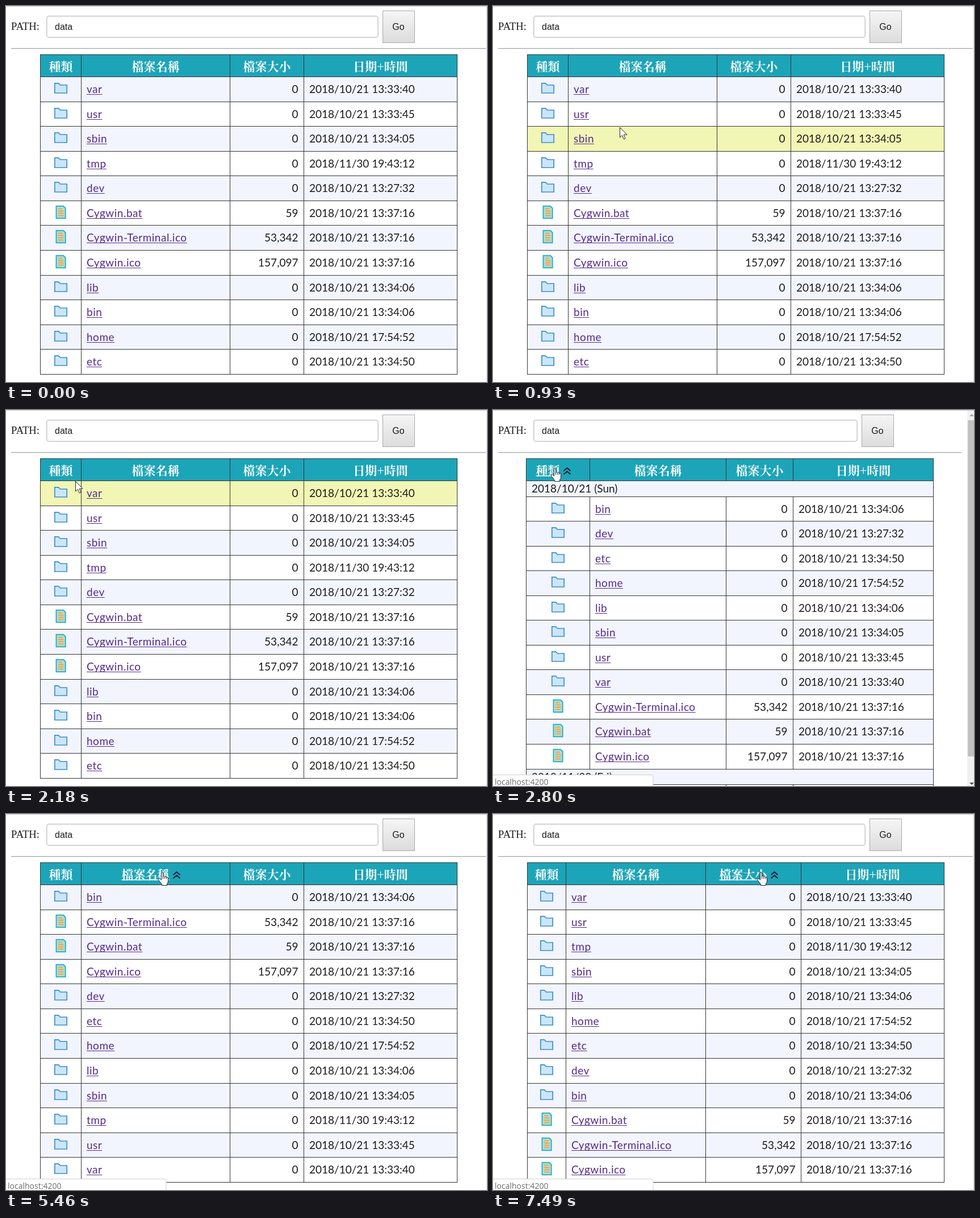
Animation, 847 px wide and 661 px high, one loop 8000 ms. Source, as an HTML page with a canvas:

```html
<!DOCTYPE html>
<html lang="zh-Hant">
<head>
<meta charset="utf-8">
<title>File list</title>
<style>
html, body { margin: 0; width: 100%; height: 100%; overflow: hidden; background: #fff; }
canvas { display: block; }
</style>
</head>
<body>
<canvas id="stage" width="847" height="661"></canvas>
<script>
const ctx = document.getElementById('stage').getContext('2d');
const W = 847, H = 661, LOOP = 8000;
const HEAD_TOP = 85, BODY_TOP = 124.1, ROW = 43.55, GROUP = 27.42;
const INK = '#1c1c1c', LINK = '#552a8c', LINE = '#363636';
const TITLES = ['種類', '檔案名稱', '檔案大小', '日期+時間'];
const CJK = 'bold 21px "Noto Serif CJK TC", "Noto Sans CJK TC", "Noto Sans CJK", serif';
const LATO = '19px Lato, sans-serif';
const SANS = '16px "Liberation Sans", sans-serif';

const times = {
  var: '13:33:40', usr: '13:33:45', sbin: '13:34:05', tmp: '19:43:12', dev: '13:27:32',
  lib: '13:34:06', bin: '13:34:06', home: '17:54:52', etc: '13:34:50'
};
const sizes = { 'Cygwin.bat': '59', 'Cygwin-Terminal.ico': '53,342', 'Cygwin.ico': '157,097' };
const isFile = name => name in sizes;
const dayOf = name => name === 'tmp' ? '2018/11/30' : '2018/10/21';
const list = text => text.split(' ');

// Entries starting with "#" are date group rows.
const folders = list('bin dev etc home lib sbin usr var');
const files = list('Cygwin-Terminal.ico Cygwin.bat Cygwin.ico');
const sunday = ['#2018/10/21 (Sun)', ...folders, ...files];
const friday = ['#2018/11/30 (Fri)', 'tmp'];
const byName = ['bin', ...files, ...list('dev etc home lib sbin tmp usr var')];

const plain = [60, 132, 394, 524, 794];
const grouped = [58, 170, 410, 528, 775];
const sized = [60, 128, 374, 542, 794];

const views = {
  start: { cols: plain, rows: list('var usr sbin tmp dev Cygwin.bat Cygwin-Terminal.ico Cygwin.ico lib bin home etc') },
  typeUp: { cols: grouped, rows: [...sunday, ...friday], sort: 0, up: true, scroll: true },
  typeDown: { cols: grouped, rows: [...friday, ...sunday], sort: 0, scroll: true },
  nameUp: { cols: plain, rows: byName, sort: 1, up: true },
  nameDown: { cols: plain, rows: [...byName].reverse(), sort: 1 },
  sizeUp: {
    cols: sized, sort: 2, up: true,
    rows: list('var usr tmp sbin lib home etc dev bin Cygwin.bat Cygwin-Terminal.ico Cygwin.ico')
  }
};

// [time, view, pointer, x, y, hovered title, status bar]
const steps = [
  [0, 'start'],
  [610, 'start', 'arrow', 262, 521],
  [770, 'start', 'arrow', 244, 322],
  [930, 'start', 'arrow', 223, 213],
  [1080, 'start', 'arrow', 197, 180],
  [1240, 'start', 'arrow', 170, 160],
  [1400, 'start', 'arrow', 150, 148],
  [1550, 'start', 'arrow', 139, 141],
  [1720, 'start', 'arrow', 135, 134],
  [2180, 'start', 'arrow', 122, 125],
  [2330, 'start', 'hand', 105, 106, 0],
  [2490, 'start', 'hand', 102, 102, 0],
  [2640, 'start', 'hand', 102, 102, 0, true],
  [2800, 'typeUp', 'hand', 102, 102, 0, true],
  [4040, 'typeDown', 'hand', 102, 102, 0, true],
  [4970, 'typeDown', 'arrow', 165, 103, -1, true],
  [5130, 'typeDown', 'hand', 244, 102, 1, true],
  [5300, 'typeDown', 'hand', 268, 102, 1, true],
  [5460, 'nameUp', 'hand', 268, 102, 1, true],
  [6240, 'nameDown', 'hand', 268, 102, 1, true],
  [6700, 'nameDown', 'arrow', 370, 103, -1, true],
  [6850, 'nameDown', 'arrow', 530, 104, -1, true],
  [7170, 'nameDown', 'arrow', 510, 103, -1, false],
  [7330, 'nameDown', 'hand', 465, 102, 2, false],
  [7490, 'sizeUp', 'hand', 465, 102, 2, true]
];

function rect(x, y, w, h, color) {
  ctx.fillStyle = color;
  ctx.fillRect(x, y, w, h);
}

function text(str, x, y, font, color = INK, align = 'left', spacing = 0) {
  ctx.font = font;
  ctx.fillStyle = color;
  ctx.textAlign = align;
  ctx.letterSpacing = spacing + 'px';
  ctx.fillText(str, x, y);
  return ctx.measureText(str).width;
}

function shape(path, x, y, fill, stroke, width) {
  ctx.save();
  ctx.translate(x, y);
  const p = new Path2D(path);
  if (fill) { ctx.fillStyle = fill; ctx.fill(p); }
  ctx.strokeStyle = stroke;
  ctx.lineWidth = width;
  ctx.stroke(p);
  ctx.restore();
}

function drawFolder(x, y) {
  shape('M-10.7 11.8H-4L-1 15H10.7V29H-10.7Z', x, y, '#cbe6fa', '#3e8ecb', 1.7);
}

function drawFile(x, y) {
  shape('M-8 9.8H4.5L8.2 13.5V31.2H-8Z', x, y, '#b3dcdc', '#2db2c4', 2);
  shape('M-4.5 14.5H3M-4.5 18.5H5M-4.5 22.5H5M-4.5 26.5H5', x, y, null, '#eda63c', 1.8);
}

function drawTop(scroll) {
  const right = scroll ? 642 : 656;
  rect(0, 0, W, 1, '#c4c4c4');
  text('PATH:', 9, 42, '18.6px "Liberation Serif", serif');
  ctx.beginPath();
  ctx.roundRect(71.75, 17.75, right - 72.5, 37.5, 4);
  ctx.strokeStyle = '#c6c6c6';
  ctx.lineWidth = 1.5;
  ctx.stroke();
  text('data', 86, 42, SANS);

  const bx = right + 7;
  const shade = ctx.createLinearGradient(0, 9, 0, 65);
  shade.addColorStop(0, '#f5f5f5');
  shade.addColorStop(1, '#dcdcdc');
  rect(bx, 8, 57, 57, '#a8a8a8');
  rect(bx + 1, 9, 55, 55, shade);
  text('Go', bx + 28, 42, SANS, INK, 'center');

  const ruleWidth = scroll ? 816 : 836;
  rect(9, 74, ruleWidth, 1, '#a4a4a4');
  rect(9, 75, ruleWidth, 1, '#e6e6e6');
}

function drawTitles(view, hovered) {
  const { cols, sort, up } = view;
  rect(cols[0], HEAD_TOP, cols[4] - cols[0], 40, '#1ca4b8');
  TITLES.forEach((title, i) => {
    ctx.font = CJK;
    ctx.letterSpacing = '0px';
    const w = ctx.measureText(title).width;
    const x = (cols[i] + cols[i + 1] + 1) / 2 - (w + (i === sort ? 36 : 0)) / 2;
    text(title, x, 114, CJK, '#fff');
    if (i === hovered) rect(x, 115, w, 1.5, '#fff');
    if (i === sort) {
      const chevrons = up ? 'M0 6L6 1L12 6M0 12L6 7L12 12' : 'M0 0L6 5L12 0M0 6L6 11L12 6';
      shape(chevrons, x + w + 7, 101, null, '#0c1a2c', 2);
    }
  });
}

function drawEntry(name, cols, y) {
  const [c0, c1, c2, c3] = cols;
  (isFile(name) ? drawFile : drawFolder)((c0 + c1 + 1) / 2, y);
  const w = text(name, c1 + 10, y + 29, LATO, LINK, 'left', 0.5);
  rect(c1 + 10, y + 31, w, 1, LINK);
  text(sizes[name] || '0', c3 - 9.5, y + 29, LATO, INK, 'right');
  text(`${dayOf(name)} ${times[name] || '13:37:16'}`, c3 + 10, y + 29, LATO);
}

function drawTable(view, pointer, py, hovered) {
  const { cols, rows } = view;
  const left = cols[0], width = cols[4] - left + 1;
  drawTitles(view, hovered);
  rect(left, HEAD_TOP, width, 1, LINE);
  for (const c of cols) rect(c, HEAD_TOP, 1, 40, LINE);

  let pos = BODY_TOP;
  rows.forEach((name, i) => {
    const group = name[0] === '#';
    const y = Math.round(pos);
    pos += group ? GROUP : ROW;
    const end = Math.round(pos);
    const lit = pointer === 'arrow' && py > y && py <= end;
    rect(left, y, width, end - y, lit ? '#f2f6b4' : i % 2 ? '#fff' : '#f2f5fe');
    if (group) text(name.slice(1), left + 10, y + 21, LATO);
    else drawEntry(name, cols, y);
    for (const c of group ? [left, cols[4]] : cols) rect(c, y, 1, end - y + 1, LINE);
    rect(left, y, width, 1, LINE);
    rect(left, end, width, 1, LINE);
  });
}

function triangle(x, y, dy, color) {
  ctx.beginPath();
  ctx.moveTo(x - 4, y);
  ctx.lineTo(x + 4, y);
  ctx.lineTo(x, y + dy);
  ctx.fillStyle = color;
  ctx.fill();
}

function drawScrollbar() {
  rect(835, 1, 12, H, '#f1f1f1');
  rect(836, 18, 11, 591, '#c1c1c1');
  triangle(843, 11, -4, '#a3a3a3');
  triangle(843, 655, 4, '#505050');
}

function drawStatus() {
  ctx.beginPath();
  ctx.roundRect(-5, 641.5, 287, 30, 4);
  ctx.fillStyle = '#fff';
  ctx.fill();
  ctx.strokeStyle = '#d0d0d0';
  ctx.lineWidth = 1;
  ctx.stroke();
  text('localhost:4200', 3, 659, '14px "Open Sans", sans-serif', '#6a6a6a');
}

function drawPointer(kind, x, y) {
  if (kind === 'arrow') {
    shape('M.5 .5V18L4.5 14.3L7.3 21L10 19.8L7.2 13.2H13Z', x, y, '#fff', '#222', 1);
  } else if (kind === 'hand') {
    shape('M5.5 14V2Q5.5 .5 7 .5T8.5 2V7.5Q11 6 11.7 8Q14 7 14.8 9Q17.5 8.5 17.5 11V16' +
      'Q17.5 19 15.5 21V23.5H6.5V21.5L1 14.5Q0 12.5 1.5 11.5Q3 11 5.5 14Z',
      x, y, '#fff', '#222', 1);
    shape('M8.5 7.5V12M11.7 8V12M14.8 9V12', x, y, null, '#222', 1);
  }
}

function frame() {
  const now = performance.now() % LOOP;
  const [, key, pointer, x, y, hovered, status] = steps.findLast(s => s[0] <= now);
  const view = views[key];
  rect(0, 0, W, H, '#fff');
  drawTop(view.scroll);
  drawTable(view, pointer, y, hovered);
  if (view.scroll) drawScrollbar();
  else rect(846, 0, 1, H, '#dcdcdc');
  if (status) drawStatus();
  drawPointer(pointer, x, y);
  requestAnimationFrame(frame);
}
frame();
</script>
</body>
</html>
```
